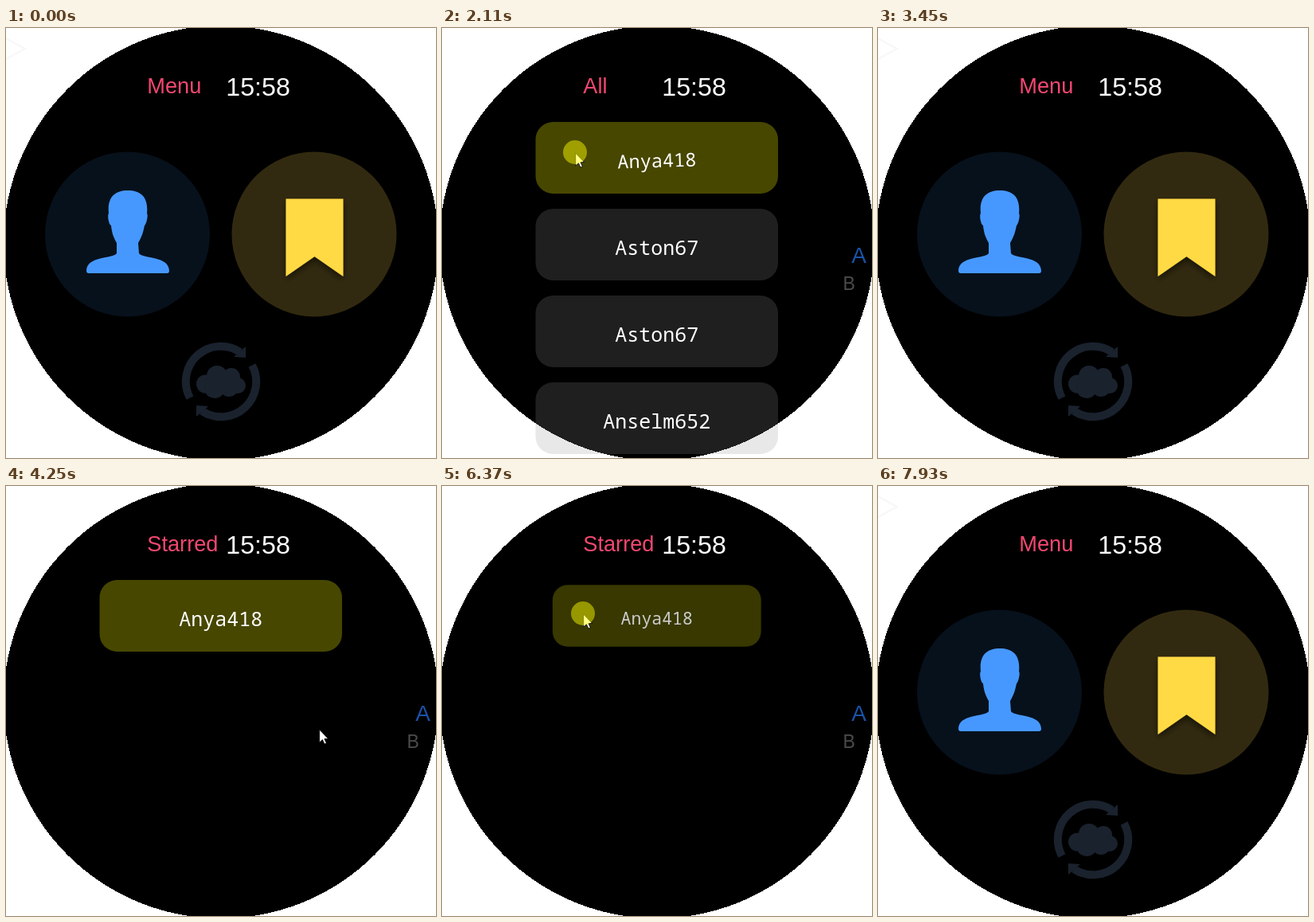
Recreate the animation shown at these times as an HTML page. Size 540 by 540 pixels, loop 8480 ms.

```html
<!DOCTYPE html>
<html lang="en">
<head>
<meta charset="utf-8">
<title>Watch menu</title>
<style>
html, body { margin: 0; width: 100%; height: 100%; overflow: hidden; background: #fff; }
svg { display: block; width: 540px; height: 540px; font-family: "Liberation Sans", Arial, sans-serif; }
.card text { font: 500 25px "Noto Sans Mono", monospace; fill: #fff; text-anchor: middle; }
.card rect { fill: rgba(146, 146, 146, .212); }
.card.star rect { fill: #474700; }
</style>
</head>
<body>
<svg viewBox="0 0 540 540">
  <defs>
    <filter id="shadow" x="-30%" y="-30%" width="160%" height="160%">
      <feDropShadow dx="0" dy="4" stdDeviation="4" flood-opacity=".55"/>
    </filter>
    <g id="arrow">
      <path d="M-39 20.5A44 44 0 0 1 24 -37" fill="none" stroke="#1a222e" stroke-width="10"/>
      <path d="M31-44V-30L16-31Z"/>
    </g>
  </defs>
  <path id="back" d="M0 13L24 26L0 39" fill="none" stroke="#f7f7f7" stroke-width="2"/>
  <circle cx="270" cy="270" r="273" shape-rendering="crispEdges"/>
  <text id="title" x="177.3" y="81.5" font-size="27.2" fill="#f34770"></text>
  <text x="276.3" y="85" font-size="32.2" fill="#fff">15:58</text>

  <g id="menu">
    <circle cx="152.5" cy="259" r="103.5" fill="#07111c"/>
    <path fill="#4698ff" d="M153 204C170 204 179 213 177 233C179 235 176 247 174 248C172 258 170 263 166 270L167 283C172 290 205 286 205 305Q205 308 202 308H104Q101 308 101 305C101 286 134 290 139 283V270C135 263 133 258 132 248C129 247 127 235 129 233C127 213 136 204 153 204Z"/>
    <circle cx="387" cy="259" r="103.5" fill="#322a10"/>
    <path fill="#ffda45" filter="url(#shadow)" d="M351.5 214.5H423.5V312L387.5 287L351.5 312Z"/>
    <g transform="translate(270 444)" fill="#1a222e">
      <use href="#arrow"/>
      <use href="#arrow" transform="rotate(180)"/>
      <circle cx="-19.5" cy="3" r="11.5"/>
      <circle cx="-5" cy="-7" r="13"/>
      <circle cx="13" cy="-6" r="11"/>
      <circle cx="21" cy="5" r="10"/>
      <circle cx="-8" cy="8" r="13"/>
      <circle cx="10" cy="7" r="12"/>
    </g>
  </g>

  <g id="list">
    <g id="cards"></g>
    <text x="514.3" y="295" font-size="28" fill="#1a52a8">A</text>
    <text x="503.6" y="328.5" font-size="23" fill="#4b4b4b">B</text>
  </g>

  <g id="cursor">
    <path d="M.7 1V17L4.4 13.5L6.9 19L9.4 18L6.9 12.5H11.7Z" fill="#fff" stroke="#000" stroke-width=".8"/>
    <circle id="press" r="15" fill="#ff0" fill-opacity=".48"/>
  </g>
</svg>
<script>
const LOOP = 8480, STEP = 78.6;
const $ = id => document.getElementById(id);
const show = (el, on) => el.style.display = on ? '' : 'none';
const within = (i, a, b) => i >= a && i < b;

const names = ['Anya418', 'Aston67', 'Aston67', 'Anselm652'];
$('cards').innerHTML = names.map((name, n) =>
  `<g class="card" transform="translate(269.75 ${163 + 109 * n})"><g>
    <rect x="-152.25" y="-45" width="304.5" height="90" rx="22"/>
    <text y="12.7">${name}</text></g></g>`).join('');
const cards = [...$('cards').children];
const first = cards[0].firstElementChild;
const label = first.querySelector('text');

// Pointer tracks: [step, x, y]
const tracks = [
  [[1, 285, 480], [5, 143, 268], [9, 143, 268], [13, 167, 156], [31, 167, 156], [36, 500, 330]],
  [[46, 507, 364], [51, 393, 305], [56, 393, 305], [67, 177, 160], [86, 177, 160], [88, 436, 185]],
  [[99, 449, 505], [100, 438, 521]]
];
const presses = [[6, 7], [14, 31], [52, 54], [68, 87]];

// Wobble values at every tenth of its run
const sizes = [1, .9, .9, 1.1, 1.1, 1.1, 1.1, 1.1, 1.1, 1.1, 1];
const turns = [0, -3, -3, 3, -3, 3, -3, 3, -3, 3, 0];
const sample = (list, p) => {
  const k = Math.min(9, Math.floor(p * 10));
  return list[k] + (list[k + 1] - list[k]) * (p * 10 - k);
};
const clamp = v => Math.max(0, Math.min(1, v));

function pointerAt(i) {
  const track = tracks.find(t => i >= t[0][0] && i <= t[t.length - 1][0]);
  if (!track) return null;
  const k = track.findIndex((key, n) => n && i <= key[0]);
  const [i0, x0, y0] = track[k - 1], [i1, x1, y1] = track[k];
  const p = (i - i0) / (i1 - i0), e = p * p * (3 - 2 * p);
  return [x0 + (x1 - x0) * e, y0 + (y1 - y0) * e];
}

function draw(now) {
  const i = Math.floor((now % LOOP + 15) / STEP);
  const all = within(i, 7, 44), starred = within(i, 54, 97), inList = all || starred;
  $('title').textContent = all ? 'All' : starred ? 'Starred' : 'Menu';
  show($('menu'), !inList);
  show($('back'), !inList);
  show($('list'), inList);
  cards.forEach((card, n) => show(card, all || n === 0));
  cards[0].classList.toggle('star', i >= 27);

  const wobble = clamp((i - 26.4) / 10.6);
  label.setAttribute('transform', `rotate(${sample(turns, wobble)}) scale(${sample(sizes, wobble)})`);
  const out = i < 81 ? 0 : clamp(.2 + (i - 81) * .8 / 3);
  first.setAttribute('transform', `scale(${1 - .7 * out})`);
  first.setAttribute('opacity', 1 - out);

  const at = pointerAt(i);
  show($('cursor'), at);
  if (at) $('cursor').setAttribute('transform', `translate(${at})`);
  show($('press'), presses.some(([a, b]) => within(i, a, b)));
}

function tick() {
  draw(performance.now());
  requestAnimationFrame(tick);
}
tick();
</script>
</body>
</html>
```
